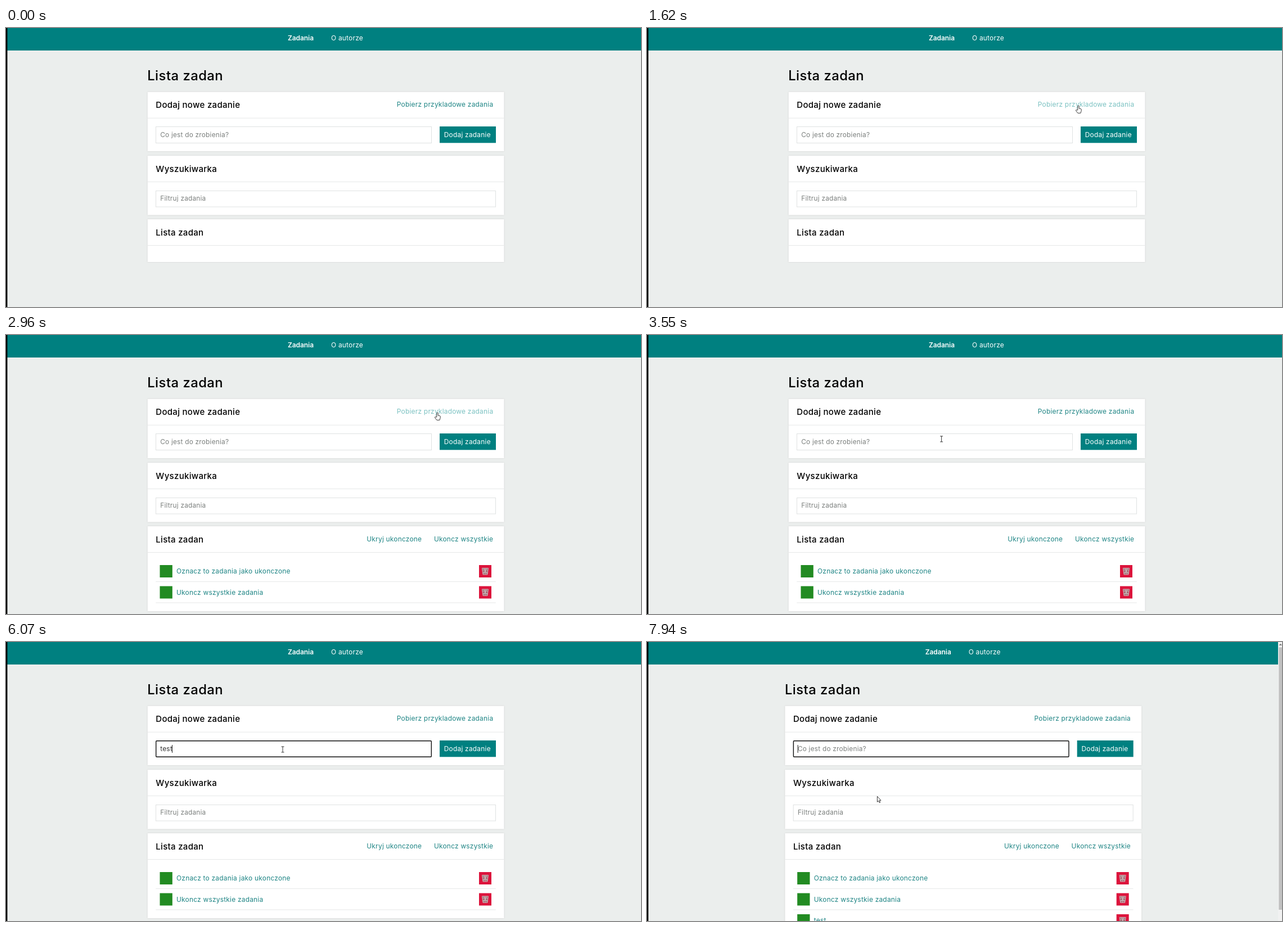
An HTML page that plays this animation: 1129x496 px, repeating every 8000 ms.

```html
<!DOCTYPE html>
<html lang="pl">
<head>
<meta charset="utf-8">
<title>Lista zadan</title>
<style>
  html, body { margin: 0; width: 100%; height: 100%; overflow: hidden; background: #ebeeed; }
  svg { display: block; }
  text { font: 11.9px Inter, "Open Sans", sans-serif; letter-spacing: .02em; fill: #1f8585; white-space: pre; }
  .h1 { font-size: 23.8px; font-weight: 450; fill: #000; }
  .h2 { font-size: 15px; font-weight: 450; fill: #000; }
  .hint { font-size: 11.8px; fill: #7b7f7d; }
  .value { fill: #333; }
  .light { fill: #fff; }
  .active { font-weight: 600; letter-spacing: 0; }
  .end { text-anchor: end; }
  .card { fill: #fff; filter: drop-shadow(0 0 1.2px #ccc); }
  .line { fill: #e6e8e8; }
  .field { fill: #fff; stroke: #dfe2e2; }
</style>
</head>
<body>
<svg id="stage" width="1129" height="496" viewBox="0 0 1129 496"></svg>
<script>
const LOOP = 8000;
const TEAL = [0, 128, 128], LINK = [31, 133, 133], HOVER = [124, 194, 194], GRAY = [208, 208, 208];
const BUTTON_HOVER = [0, 148, 148];

const rect = (x, y, w, h, attrs) => `<rect x="${x}" y="${y}" width="${w}" height="${h}" ${attrs}/>`;
const text = (x, y, label, cls = '', attrs = '') =>
  `<text x="${x}" y="${y}" class="${cls}" ${attrs}>${label}</text>`;
const card = (y, h, title, attrs = '') =>
  rect(251.7, y, 633.8, h, `class="card" ${attrs}`) +
  rect(251.7, y + 46, 633.8, 1, 'class="line"') +
  text(266.3, y + 28.5, title, 'h2');

const basket = `<g fill="none" stroke="#c9c5c5" stroke-width=".9">
  <path d="M-5.5-5.5H5.5L4 5.8H-4Z" fill="#a5606a"/>
  <path d="M-5-2.2H5M-4.6 1.8H4.6M-3-5.5L3.6 5M3-5.5L-3.6 5M0-5.5V5.8"/></g>`;

const row = (y, label) =>
  rect(273.5, y, 22.3, 22, 'fill="#228b22"') +
  text(303, y + 15.2, label) +
  rect(841, y, 22, 22, 'fill="#dc143c"') +
  `<g transform="translate(852 ${y + 11})">${basket}</g>` +
  rect(266.3, y + 29, 604.5, 1, 'class="line"');

const stage = document.getElementById('stage');
stage.innerHTML =
  rect(0, 0, 1129, 496, 'fill="#ebeeed"') +
  rect(0, 0, 1129, 40, 'fill="#008080"') +
  `<g id="page">` +
    text(501, 22.3, 'Zadania', 'light active') +
    text(578, 22.3, 'O autorze', 'light') +
    text(251.2, 92.5, 'Lista zadan', 'h1') +
    card(113.7, 105.3, 'Dodaj nowe zadanie') +
    text(866.3, 140.3, '', 'end', 'id="link"') +
    rect(266.5, 175.5, 490, 29, 'class="field"') +
    rect(266.7, 175.7, 489.6, 28.6, 'id="focus" rx="1.5" fill="none" stroke="#101010" stroke-width="1.4"') +
    text(274.2, 194, 'Co jest do zrobienia?', 'hint', 'id="hint"') +
    text(274.2, 194, '', 'value', 'id="value"') +
    rect(274, 183, 1, 14, 'id="caret" fill="#222"') +
    rect(771, 175, 100, 29.3, 'id="button"') +
    text(778.8, 194, 'Dodaj zadanie', 'light') +
    card(227, 105.5, 'Wyszukiwarka') +
    rect(266.5, 289.5, 604, 28.5, 'class="field"') +
    text(274.2, 307, 'Filtruj zadania', 'hint') +
    card(340, 76, 'Lista zadan', 'id="listCard"') +
    `<g id="list">` +
      text(739.3, 367.3, 'Ukryj ukonczone', 'end') +
      text(866.3, 367.3, 'Ukoncz wszystkie', 'end') +
      row(409, 'Oznacz to zadania jako ukonczone') +
      row(446.5, 'Ukoncz wszystkie zadania') +
      `<g id="added">${row(484, 'test')}</g>` +
    `</g>` +
  `</g>` +
  rect(0, 0, 2.4, 496, 'fill="#000"') +
  `<g id="scrollbar">` +
    rect(1122, 0, 7, 496, 'fill="#f1f1f1"') +
    rect(1123.3, 9.5, 5.7, 466.5, 'fill="#c1c1c1"') +
    `<path d="M1123.5 6L1126.5 3L1129 6Z" fill="#777"/>` +
  `</g>` +
  `<g id="cursor" fill="#fff" stroke="#222" stroke-width=".9" stroke-linejoin="round">
    <path id="arrow" d="M.4.4V10.4L2.6 8.3L4.2 11.8L5.7 11.1L4.2 7.7H7Z"/>
    <path id="beam" d="M-2.5-5H2.5M0-5V5M-2.5 5H2.5"/>
    <path id="hand" d="M-1.2 8V1.3a1.2 1.2 0 0 1 2.4 0V5l3.2.8q1.1.3 1 1.5l-.6 3.2-.9 2.8h-5l-3.6-4.8q.3-1.5 1.7-.8Z"/>
  </g>`;

const el = {};
for (const node of stage.querySelectorAll('[id]')) el[node.id] = node;

// time, x, y
const path = [
  [110, 1003, 447], [490, 821, 293], [570, 821, 305], [690, 821, 305],
  [970, 765, 160], [1180, 767, 138], [3020, 767, 138], [3620, 492, 191],
  [7460, 492, 191], [7940, 409, 274]
];
// time, typed text, caret visible
const typing = [
  [0, '', false], [3810, '', true], [4340, '', false], [4880, 't', true],
  [5280, 'te', true], [5810, 'te', false], [5940, 'tes', true], [6070, 'test', true],
  [6590, '', true], [7130, '', false], [7630, '', true]
];

const ramp = (t, a, b) => Math.min(1, Math.max(0, (t - a) / (b - a)));
const mix = (a, b, k) => `rgb(${a.map((v, i) => Math.round(v + (b[i] - v) * k))})`;
const show = (node, on) => node.setAttribute('visibility', on ? 'inherit' : 'hidden');
const within = ([x, y], x0, y0, x1, y1) => x >= x0 && x <= x1 && y >= y0 && y <= y1;

function pointer(t) {
  const i = path.findIndex(p => p[0] > t);
  if (i < 0) return path.at(-1).slice(1);
  if (i === 0) return path[0].slice(1);
  const [t0, x0, y0] = path[i - 1], [t1, x1, y1] = path[i];
  const k = ramp(t, t0, t1);
  return [x0 + (x1 - x0) * k, y0 + (y1 - y0) * k];
}

function cursorShape(p, loading) {
  if (within(p, 695, 126, 866, 146)) return loading ? 'arrow' : 'hand';
  if (within(p, 771, 175, 871, 204)) return 'hand';
  if (within(p, 266, 175, 756, 204) || within(p, 266, 289, 871, 318)) return 'beam';
  return 'arrow';
}

function linkColor(t, loading) {
  if (loading) return mix(HOVER, GRAY, ramp(t, 1700, 2200));
  if (t < 1700) return mix(LINK, HOVER, ramp(t, 1130, 1490));
  return mix(HOVER, LINK, ramp(t, 3080, 3560));
}

function draw(t) {
  const loading = t >= 1700 && t < 2960;
  const loaded = t >= 2960, added = t >= 6590;

  el.page.setAttribute('transform', `translate(${added ? -6.3 : 0} 0)`);
  show(el.scrollbar, added);
  show(el.list, loaded);
  show(el.added, added);
  el.listCard.setAttribute('height', added ? 189 : loaded ? 151 : 76);

  el.link.textContent = loading ? 'Ladowanie...' : 'Pobierz przykladowe zadania';
  el.link.style.fill = linkColor(t, loading);
  const glow = ramp(t, 860, 900) * (1 - ramp(t, 920, 965));
  el.button.setAttribute('fill', mix(TEAL, BUTTON_HOVER, glow));

  const [, typed, caretOn] = typing.findLast(s => s[0] <= t);
  el.value.textContent = typed;
  show(el.hint, !typed);
  show(el.focus, t >= 3810);
  show(el.caret, caretOn);
  el.caret.setAttribute('x', 274 + Math.round(typed ? el.value.getComputedTextLength() - .8 : 0));

  const p = pointer(t), shape = cursorShape(p, loading);
  show(el.cursor, t >= 110);
  el.cursor.setAttribute('transform', `translate(${p[0].toFixed(1)} ${p[1].toFixed(1)})`);
  for (const name of ['arrow', 'beam', 'hand']) show(el[name], name === shape);
}

const start = performance.now();
function tick() {
  draw((performance.now() - start) % LOOP);
  requestAnimationFrame(tick);
}
tick();
</script>
</body>
</html>
```
